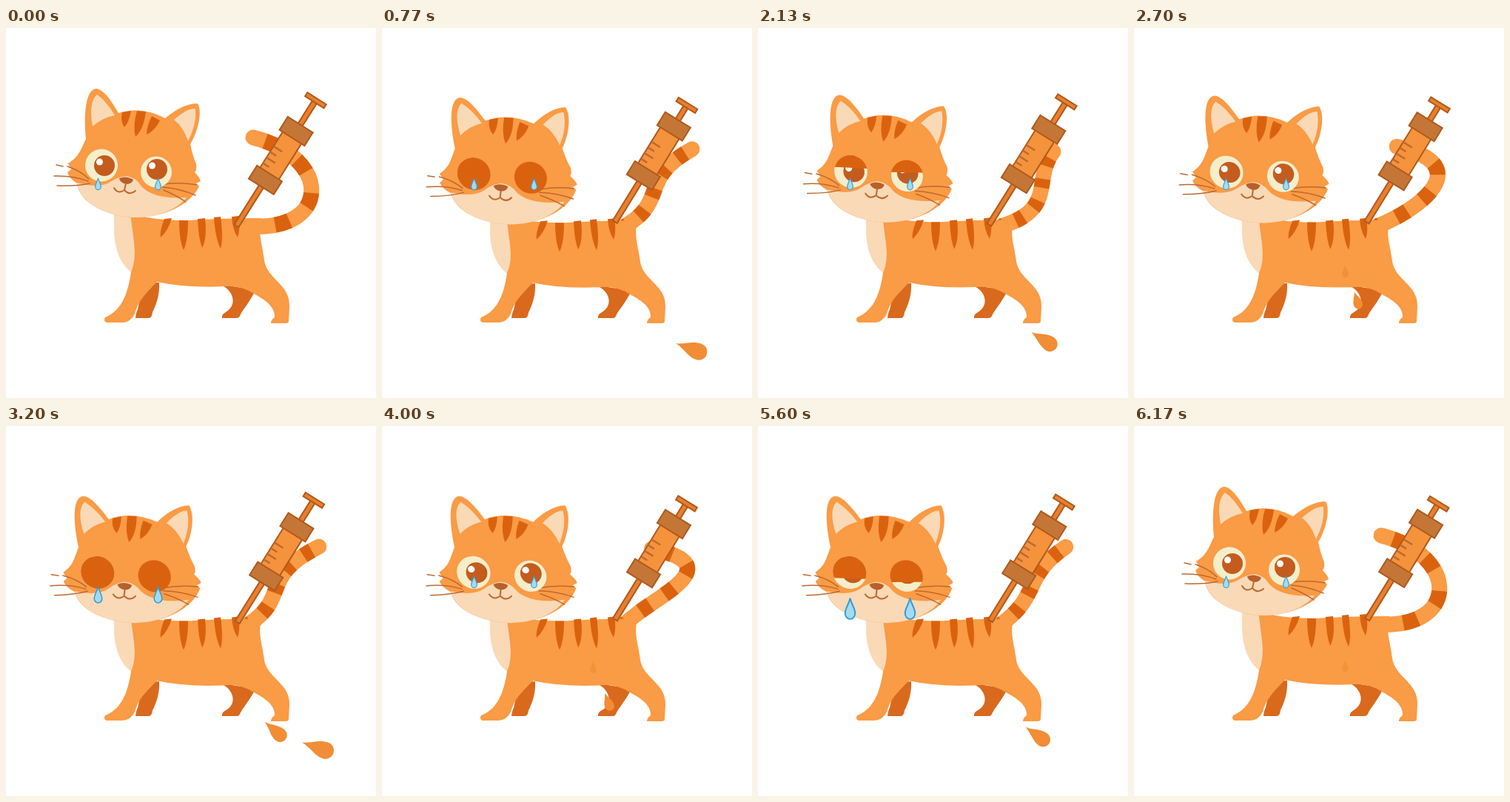
Recreate the animation shown at these times as an HTML page. Size 500 by 500 pixels, loop 6210 ms.

```html
<!DOCTYPE html>
<html lang="en">
<head>
<meta charset="utf-8">
<title>Crying cat</title>
<style>
html, body { margin: 0; width: 100%; height: 100%; overflow: hidden; background: #fff; }
svg { display: block; width: 100vw; height: 100vh; }
.fur { fill: #fa9b45; }
.cream { fill: #fad9b6; }
.stripe { fill: #da620f; }
.leg { fill: #d9691d; }
.line { fill: none; stroke: #bd6a31; stroke-linecap: round; stroke-linejoin: round; }
.tool { stroke: #b05a1c; stroke-width: 2; }
.tear { fill: #a5dbed; stroke: #2d9cdb; stroke-width: 2; }
.drop { fill: #f18d35; }
</style>
</head>
<body>
<svg viewBox="0 0 500 500">
  <defs>
    <clipPath id="leftEye"><circle cx="129" cy="185.500" r="22"/></clipPath>
    <clipPath id="rightEye"><circle cx="203" cy="194.500" r="21.500"/></clipPath>
    <path id="tearShape" d="M0-15C2-6 7-1 7 6A7 8 0 0 1-7 6C-7-1-2-6 0-15Z"/>
    <path id="dropShape" d="M0-24C2-12 12-4 12 11A12 12 0 0 1-12 11C-12-1-4-9 0-24Z"/>
  </defs>

  <g fill="none" stroke-width="21">
    <path id="tail" stroke="#fa9b45" stroke-linecap="round"/>
    <path id="bands" stroke="#da620f" pathLength="100" stroke-dasharray="9 13.5" stroke-dashoffset="6.5"/>
  </g>

  <g id="body">
    <path class="leg" d="M186 344H207C208 360 203 374 198 384Q197 392 193 392H175Q175 386 178 380Z"/>
    <path class="leg" d="M288 346L337 354C330 370 320 380 316 389Q315 392 311 392H292Q291 387 297 384C307 378 309 368 304 359Q300 351 288 346Z"/>
    <path class="cream" d="M147 240C145 270 142 312 173 333L182 250Z"/>
    <path class="fur" d="M168 250Q195 260 245 260Q290 257 345 257C340 280 347 294 349 314C353 340 384 346 383 376L382 396Q382 399 378 399H358Q358 394 363 391C364 375 347 366 335 359Q318 348 300 349Q245 352 204 343C188 360 179 368 174 386Q169 397 158 398H136Q131 396 134 391C158 381 165 356 169 330Q176 314 173 290Z"/>
    <g class="stripe">
      <path d="M214 258L224 257Q219 274 209 283Q207 276 214 258Z"/>
      <path d="M234 260H246Q246 287 240 300Q234 287 234 260Z"/>
      <path d="M259 258L269 257Q272 285 265 297Q260 284 259 258Z"/>
      <path d="M281 256L290 255Q294 285 290 298Q283 285 281 256Z"/>
      <path d="M305 255L314 254Q317 272 313 283Q306 272 305 255Z"/>
    </g>
  </g>

  <g id="drops"></g>

  <g id="syringe">
    <g id="plunger" class="tool" fill="#e87f2e">
      <rect x="-3.500" y="-201" width="7" height="60"/>
      <rect x="-15" y="-205" width="30" height="6"/>
    </g>
    <rect class="tool" x="-3.500" y="-68" width="7" height="68" fill="#e87f2e"/>
    <rect class="tool" x="-15" y="-144" width="30" height="64" fill="#f5923c"/>
    <path class="line" stroke-width="2.500" d="M-14-118h12M-14-109h8M-14-100h12M-14-91h8"/>
    <g class="tool" fill="#c47637">
      <rect x="-20" y="-162" width="40" height="21"/>
      <rect x="-20" y="-84" width="40" height="21"/>
    </g>
  </g>

  <g id="head">
    <path class="fur" d="M108 150C105 118 107 83 122 82C132 83 142 98 152 115Q183 105 215 122Q239 102 259 102C266 114 259 141 249 157Q252 172 257 184Q258 192 255 195Q262 202 263 207L257 210L261 214C248 240 212 257 170 256C132 253 99 235 96 210Q85 203 83 195L88 191L84 183C99 174 101 164 108 150Z"/>
    <path class="cream" d="M96 209Q124 217 139 209Q151 201 163 200Q176 202 183 214Q200 232 244 229C229 248 200 257 170 256C132 253 99 235 96 209Z"/>
    <path class="cream" d="M117 133Q111 100 123 90Q135 98 147 118Q130 121 117 133Z"/>
    <path class="cream" d="M227 124Q245 108 256 109Q258 130 246 153Q240 134 227 124Z"/>
    <g class="stripe">
      <path d="M157 114L169 112Q166 128 160 134Q154 126 157 114Z"/>
      <path d="M177 112L189 113Q186 137 175 147Q171 133 177 112Z"/>
      <path d="M197 119L208 125Q202 138 190 144Q190 133 197 119Z"/>
    </g>
    <g class="line" stroke-width="1.500">
      <path d="M68 185L77 187M83 187Q101 193 112 204M65 200Q91 199 111 207M69 213Q95 214 113 210"/>
      <path d="M213 211Q235 208 258 212M212 215Q236 217 256 226M213 219Q230 226 243 235"/>
    </g>
    <g fill="#f5eecb">
      <circle cx="129" cy="185.500" r="22"/>
      <circle cx="203" cy="194.500" r="21"/>
    </g>
    <g fill="#c45c1e">
      <circle cx="133" cy="186" r="14"/>
      <circle cx="204" cy="191" r="14"/>
    </g>
    <g fill="#fff">
      <circle cx="126.500" cy="181" r="4.500"/>
      <circle cx="197.500" cy="186" r="4.500"/>
    </g>
    <g class="stripe">
      <g clip-path="url(#leftEye)"><rect id="leftLid" x="100" y="163" width="60" transform="rotate(5 129 186)"/></g>
      <g clip-path="url(#rightEye)"><rect id="rightLid" x="173" y="172" width="60" transform="rotate(3 203 194)"/></g>
    </g>
    <path d="M153 203Q163 199 172 205Q170 211 162 211Q154 209 153 203Z" fill="#b8602a"/>
    <path class="line" stroke-width="2" d="M146 216Q151 225 160 219L162 210M160 219Q167 227 175 220"/>
  </g>

  <use id="leftTear" class="tear" href="#tearShape"/>
  <use id="rightTear" class="tear" href="#tearShape"/>
</svg>
<script>
const LOOP = 6210, SWAY = LOOP / 5, PUMP = LOOP / 6, CRY = LOOP / 3, FALL = 800;
const el = id => document.getElementById(id);
const set = (node, attrs) => { for (const k in attrs) node.setAttribute(k, attrs[k]); };
const ramp = (t, from, to) => Math.max(0, Math.min(1, (t - from) / (to - from)));
const smooth = x => x * x * (3 - 2 * x);

// Each pose is two control points and the tip of one Bezier curve.
const curled = { at: 100, bend: [440, 275, 440, 175, 334, 148] };
const open = { at: 288, bend: [360, 232, 478, 190, 365, 166] };
const right = { at: 730, bend: [385, 230, 340, 205, 423, 163] };
const upright = { at: 888, bend: [405, 245, 370, 205, 399, 167] };
const poses = [curled, open, right, upright, { ...curled, at: 1190 }];

function tailPath(t) {
  const next = Math.max(1, poses.findIndex(p => p.at >= t));
  const [a, b] = t > 1190 ? [curled, curled] : [poses[next - 1], poses[next]];
  const k = smooth(ramp(t, a.at, b.at));
  return "M328 268C" + a.bend.map((v, i) => v + (b.bend[i] - v) * k).join(" ");
}

const dropStarts = [60, 1520, 2480, 2670, 3750, 3980, 5020, 6155];
const drops = dropStarts.map(() => {
  const use = document.createElementNS("http://www.w3.org/2000/svg", "use");
  set(use, { class: "drop", href: "#dropShape" });
  el("drops").append(use);
  return use;
});

function drawCat(t) {
  const dip = ramp(t, 60, 270) * (1 - ramp(t, 740, 1190));
  const lid = ramp(t, 540, 680) * (1 - ramp(t, 790, 950));
  set(el("head"), { transform: `matrix(${1 + 0.025 * dip} ${-0.055 * dip} ${0.12 * dip} 1 ${-30.7 * dip} ${19.5 * dip})` });
  set(el("body"), { transform: `translate(0 ${9.9 * dip}) scale(1 ${1 - 0.025 * dip})` });
  for (const id of ["leftLid", "rightLid"]) set(el(id), { height: 46 * lid });

  const d = tailPath(t);
  set(el("tail"), { d });
  set(el("bands"), { d });
}

function drawSyringe(t) {
  const pull = (t / PUMP) ** 0.4;
  set(el("syringe"), { transform: `translate(311 268) rotate(${32.3 - 0.7 * pull}) translate(0 ${-8 * pull})` });
  set(el("plunger"), { transform: `translate(0 ${19 * pull})` });
}

function drawTears(t) {
  const fresh = t > 1760;
  const fall = fresh ? 0 : ramp(t, 930, 1700) ** 0.75;
  const size = fresh ? 0.55 * ramp(t, 1700, 1900) : 0.55 + 0.55 * fall;
  const opacity = fresh ? 1 : 1 - ramp(t, 1600, 1760);
  [["leftTear", 124.5], ["rightTear", 205.5]].forEach(([id, x]) =>
    set(el(id), { transform: `translate(${x} ${211 + 48 * fall}) scale(${size})`, opacity }));
}

function drawDrop(node, k) {
  const x = 285 + 165 * k ** 1.8, y = 316 + 128 * k ** 0.7;
  set(node, {
    transform: `translate(${x} ${y}) rotate(${-80 * k ** 1.2}) scale(${0.32 + 0.7 * k})`,
    opacity: ramp(k, -0.06, 0.06)
  });
}

function draw(t) {
  drawCat(t % SWAY);
  drawSyringe(t % PUMP);
  drawTears(t % CRY);
  drops.forEach((node, i) => {
    const k = (t - dropStarts[i]) / FALL;
    const visible = k >= 0 && k <= 1;
    set(node, { visibility: visible ? "visible" : "hidden" });
    if (visible) drawDrop(node, k);
  });
}

const start = performance.now();
function tick() {
  draw((performance.now() - start) % LOOP);
  requestAnimationFrame(tick);
}
tick();
</script>
</body>
</html>
```
